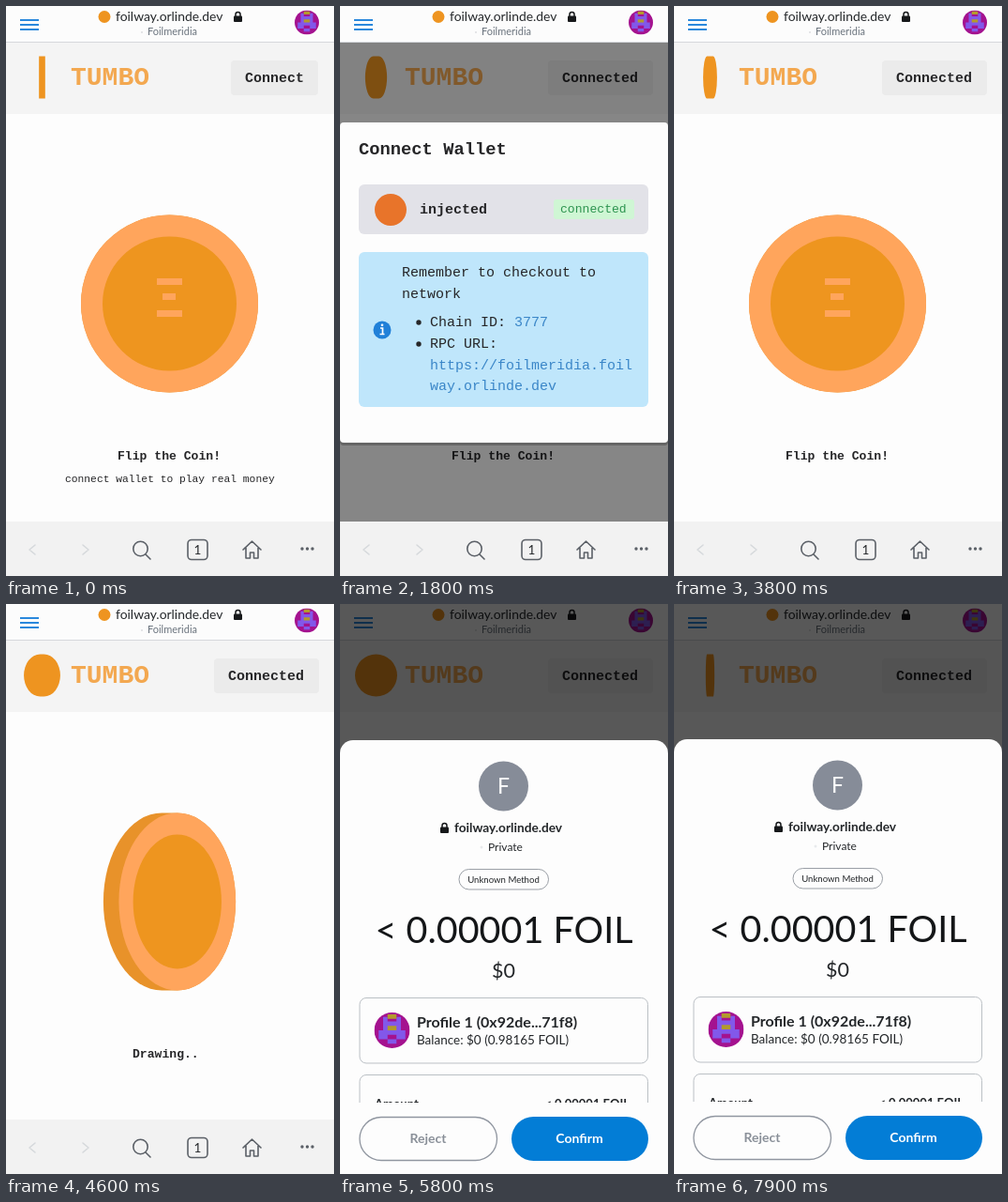
An HTML page that plays this animation: 350x607 px, repeating every 8000 ms.

```html
<!DOCTYPE html>
<html lang="en">
<head>
<meta charset="utf-8">
<title>Coin flip</title>
<style>
html, body { margin: 0; width: 100%; height: 100%; overflow: hidden; background: #fdfdfd; }
svg { display: block; width: 100vw; height: 100vh; }
text { font-family: Lato, 'Open Sans', sans-serif; fill: #24272a; white-space: pre; }
.mono { font-family: 'Liberation Mono', 'Courier New', monospace; fill: #262628; }
.b { font-weight: 700; }
.mid { text-anchor: middle; }
.link { fill: #3a86c8; }
.line { fill: none; stroke: #5b6067; stroke-width: 1.6; stroke-linecap: round; stroke-linejoin: round; }
.faint { stroke: #d6d9dc; }
.card { fill: none; stroke: #bbc0c5; }
</style>
</head>
<body>
<svg viewBox="0 0 350 607">
  <defs>
    <clipPath id="round"><circle cx="4" cy="4" r="4"/></clipPath>
    <clipPath id="scroll"><rect y="495" width="350" height="36"/></clipPath>
    <g id="avatar" clip-path="url(#round)">
      <rect width="8" height="8" fill="#a4128f"/>
      <path fill="#8258ea" d="M2 1h1v1h2v-1h1v3h1v2h-2v-1h-2v1h-2v-2h1zM3 6h2v1h-2z"/>
      <path fill="#b39a2c" d="M3 .4h2v1h-2zM3 3h2v1h-2z"/>
    </g>
    <g id="lock">
      <path d="M2.5 5V3a2.5 2.5 0 0 1 5 0v2" fill="none" stroke="#16181a" stroke-width="1.5"/>
      <rect x=".5" y="4.5" width="9" height="6.5" rx="1" fill="#16181a"/>
    </g>
  </defs>

  <!-- page -->
  <rect width="350" height="607" fill="#fdfdfd"/>
  <rect y="39" width="350" height="76" fill="#f4f4f4"/>
  <path id="logo" fill="#ee9420"/>
  <text class="mono b" x="69" y="84" font-size="28" style="fill:#f3a850">TUMBO</text>
  <rect id="btn" y="58" height="37" rx="4" fill="#ebebeb"/>
  <text id="btnText" class="mono b" y="81" font-size="15"></text>

  <path id="rim" fill="#e8922a"/>
  <g id="face">
    <circle r="94.5" fill="#ffa55c"/>
    <circle r="71.5" fill="#ee951f"/>
    <path id="bars" fill="#ffa55c" d="M-13.5-27h27v7h-27zM-7.5-11h14v7h-14zM-13.5 7h27v7h-27z"/>
  </g>
  <text id="status" class="mono b" y="483" font-size="13.1"></text>
  <text id="hint" class="mono" x="63" y="507" font-size="11.3">connect wallet to play real money</text>

  <!-- wallet dialog -->
  <rect id="shade" y="39" width="350" height="511"/>
  <g id="dialog">
    <rect y="127" width="350" height="341" rx="4" opacity=".25"/>
    <rect y="124" width="350" height="341" rx="4" fill="#fdfdfd"/>
    <text class="mono b" x="20" y="158" font-size="18.8">Connect Wallet</text>
    <rect id="row" x="20" y="190" width="309" height="53" rx="6"/>
    <circle cx="54" cy="217" r="17" fill="#e8742a"/>
    <text class="mono b" x="85" y="221" font-size="15">injected</text>
    <g id="badge">
      <rect x="228" y="206" width="86" height="21" rx="3" fill="#cff6d4"/>
      <text class="mono" x="235" y="220" font-size="13.1" style="fill:#2e9450">connected</text>
    </g>
    <rect x="20" y="262" width="309" height="165" rx="6" fill="#bfe6fb"/>
    <circle cx="45" cy="345" r="9.5" fill="#2080d8"/>
    <path d="M43 343h2.5v6M42.5 349.5h5" fill="none" stroke="#fff" stroke-width="1.7"/>
    <circle cx="45" cy="339.8" r="1.3" fill="#fff"/>
    <g font-size="15">
      <text class="mono" x="66" y="288">Remember to checkout to</text>
      <text class="mono" x="66" y="311">network</text>
      <text class="mono" x="96" y="341">Chain ID: <tspan class="link">3777</tspan></text>
      <text class="mono" x="96" y="364">RPC URL:</text>
      <text class="mono" x="96" y="386.5"><tspan class="link">https://foilmeridia.foil</tspan></text>
      <text class="mono" x="96" y="409"><tspan class="link">way.orlinde.dev</tspan></text>
    </g>
    <circle cx="84" cy="337" r="2.7" fill="#262628"/>
    <circle cx="84" cy="360" r="2.7" fill="#262628"/>
  </g>

  <!-- browser bars -->
  <rect width="350" height="38" fill="#fcfcfc"/>
  <path d="M0 38.5h350" stroke="#d6d8dc"/>
  <path d="M15 15h20M15 20h20M15 25h20" stroke="#2a88dc" stroke-width="1.8"/>
  <circle cx="105" cy="11.5" r="6.5" fill="#ee9420"/>
  <text x="117" y="16" font-size="13.9">foilway.orlinde.dev</text>
  <use href="#lock" x="242.5" y="6"/>
  <circle cx="145" cy="28" r="1" fill="#dcdee0"/>
  <text x="151" y="31" font-size="11" style="fill:#6a737d">Foilmeridia</text>
  <use href="#avatar" transform="translate(308 4.5) scale(3.25)"/>
  <rect y="549" width="350" height="58" fill="#f2f2f2"/>
  <path class="line faint" d="M31 574l-6 5 6 5M82 574l6 5-6 5"/>
  <circle class="line" cx="143.5" cy="578" r="7.7"/>
  <path class="line" d="M149 584l5 5M253 579l9.5-9 9.5 9M256 577v11h4.5v-6h4v6h4.5v-11"/>
  <rect class="line" x="194" y="568.5" width="21" height="21" rx="4"/>
  <text class="mid" x="204.5" y="584" font-size="13.5">1</text>
  <g fill="#5b6067">
    <circle cx="316" cy="578" r="1.7"/><circle cx="321.5" cy="578" r="1.7"/><circle cx="327" cy="578" r="1.7"/>
  </g>

  <!-- confirmation sheet -->
  <rect id="dim" width="350" height="607"/>
  <g id="sheet">
    <rect y="145" width="350" height="490" rx="14" fill="#fdfdfd"/>
    <circle cx="174.5" cy="194" r="26.5" fill="#868c98"/>
    <text class="mid" x="174.5" y="202" font-size="23" style="fill:#fff">F</text>
    <use href="#lock" x="106.5" y="233"/>
    <text class="b" x="122" y="243" font-size="13.7">foilway.orlinde.dev</text>
    <circle cx="151" cy="259" r="1.5" fill="#e8eaec"/>
    <text x="158" y="263" font-size="12">Private</text>
    <rect class="card" x="127" y="282.5" width="95.5" height="21.5" rx="10.7" style="stroke:#9a9fa6"/>
    <text class="mid" x="174.5" y="297" font-size="9.6">Unknown Method</text>
    <text class="mid" x="175" y="361" font-size="39.5" style="fill:#141618">&lt; 0.00001 FOIL</text>
    <text class="mid" x="174.5" y="398" font-size="21.5">$0</text>
    <rect class="card" x="21" y="419.5" width="307.5" height="69.5" rx="7"/>
    <use href="#avatar" transform="translate(36.5 435) scale(4.75)"/>
    <text class="b" x="82" y="451" font-size="16">Profile 1 (0x92de...71f8)</text>
    <text x="82" y="469" font-size="13.5">Balance: $0 (0.98165 FOIL)</text>
    <g clip-path="url(#scroll)">
      <rect class="card" x="21" y="501.5" width="307.5" height="69" rx="7"/>
      <text class="b" x="37" y="537" font-size="13">Amount</text>
      <text class="b" x="309" y="537" font-size="13" text-anchor="end">&lt; 0.00001 FOIL</text>
    </g>
    <rect x="21" y="546.5" width="146.5" height="46" rx="23" fill="none" stroke="#9096a0" stroke-width="1.3"/>
    <text class="mid b" x="94" y="574" font-size="14" style="fill:#8a9099">Reject</text>
    <rect x="183" y="546" width="146" height="47" rx="23.5" fill="#037dd6"/>
    <text class="mid b" x="255.5" y="574" font-size="14" style="fill:#fff">Confirm</text>
  </g>
</svg>
<script>
const LOOP = 8000, OPEN = 400, CONNECTED = 1800, CLOSE = 3100, FLIP = 4250, ASK = 5130;
const el = id => document.getElementById(id);
const set = (id, attrs) => { for (const k in attrs) el(id).setAttribute(k, attrs[k]); };
const show = (id, on) => { el(id).style.display = on ? '' : 'none'; };
const say = (id, s) => { if (el(id).textContent !== s) el(id).textContent = s; };
const ramp = (t, from, ms) => Math.min(1, Math.max(0, (t - from) / ms));
const easeOut = p => 1 - (1 - p) ** 3;

// Half turns of the small coin over time
const turns = [[0, 0], [1000, .5], [2600, 1.25], [3800, 1.94], [4600, 2.28], [5800, 2.5], [8000, 4.05]];
function turnAt(t) {
  const i = turns.findIndex(k => k[0] > t);
  const [t0, a] = turns[i - 1], [t1, b] = turns[i];
  return a + (b - a) * ramp(t, t0, t1 - t0);
}

// Outline of a disc seen at an angle: two half ellipses joined by its edge
const disc = (x, y, r, rx, half) =>
  `M${x - half} ${y - r}A${rx} ${r} 0 0 0 ${x - half} ${y + r}H${x + half}A${rx} ${r} 0 0 0 ${x + half} ${y - r}Z`;

function draw(t) {
  const connected = t >= CONNECTED, flipping = t >= FLIP;

  const p = turnAt(t) * Math.PI;
  set('logo', { d: disc(38.5, 76, 22.5, 22.5 * Math.abs(Math.sin(p)), 3.3 * Math.abs(Math.cos(p))) });

  const a = flipping ? (t - FLIP) * .374 * Math.PI / 180 : 0;
  const c = Math.cos(a), s = 11 * Math.sin(a), w = Math.abs(c);
  set('rim', { d: disc(174.5, 317, 94.5, 94.5 * w, Math.abs(s)) });
  set('face', { transform: `translate(${174.5 - Math.sign(c) * s} 317) scale(${w} 1)` });
  show('bars', c > 0);

  set('btn', connected ? { x: 222, width: 112 } : { x: 240, width: 93 });
  set('btnText', { x: connected ? 237 : 255 });
  say('btnText', connected ? 'Connected' : 'Connect');
  set('status', { x: flipping ? 135 : 119 });
  say('status', flipping ? 'Drawing' + '.'.repeat(1 + Math.floor((t - FLIP) / 300) % 3) : 'Flip the Coin!');
  show('hint', !connected);

  const open = ramp(t, OPEN, 200) - ramp(t, CLOSE, 200);
  set('shade', { opacity: .47 * open });
  set('dialog', { opacity: open });
  set('row', { fill: connected ? '#e2e2e8' : '#f1f1f1' });
  show('badge', connected);

  // The sheet glides to rest one pixel above its layout position
  set('dim', { opacity: .65 * ramp(t, ASK, 300) });
  set('sheet', { transform: `translate(0 ${465 - 466 * easeOut(ramp(t, ASK, 770))})` });
}

const start = performance.now();
function tick() {
  draw((performance.now() - start) % LOOP);
  requestAnimationFrame(tick);
}
tick();
</script>
</body>
</html>
```
